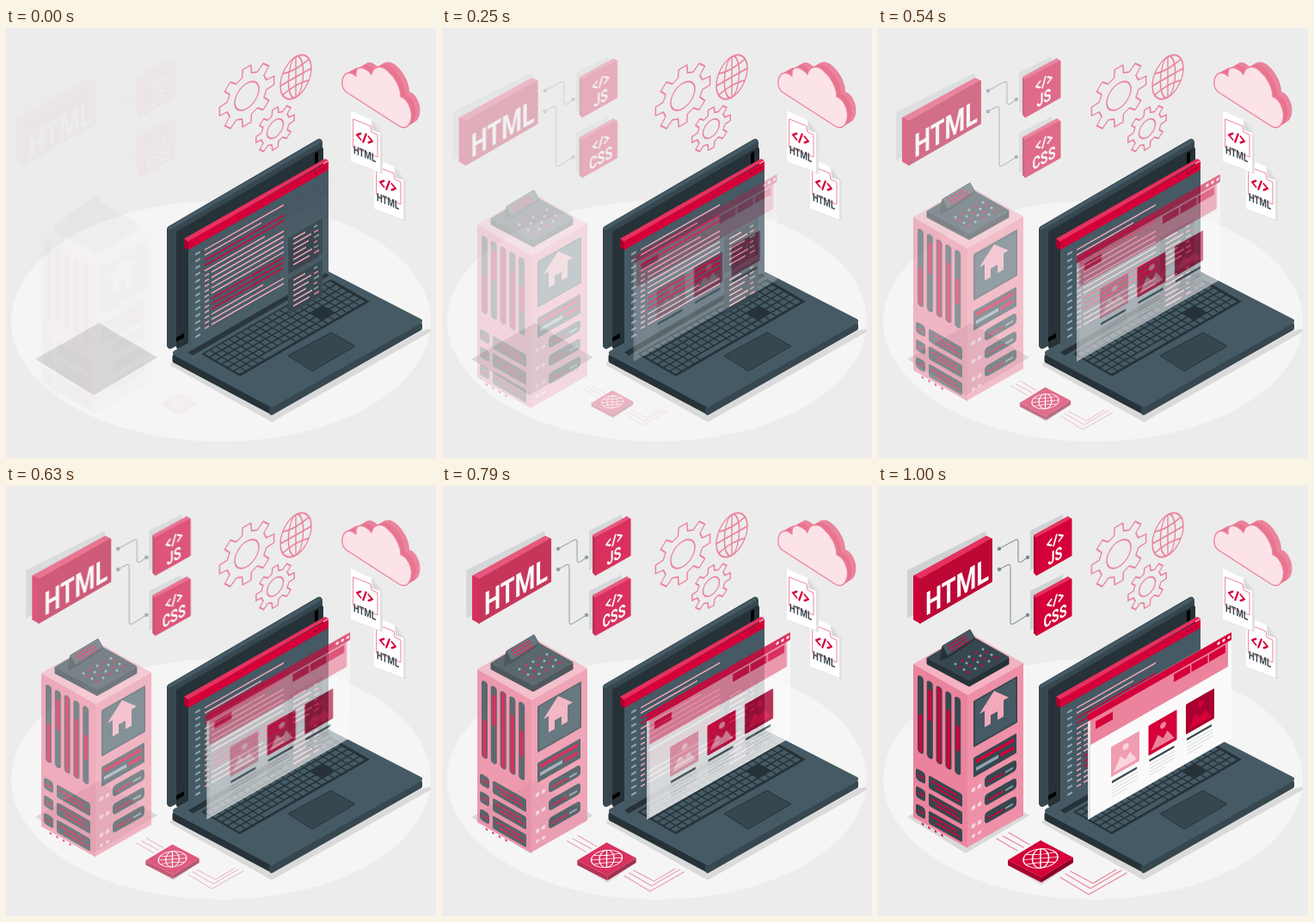
These frames come from a looping animation (500x500 px, 1.04 s). An HTML page:

```html
<!DOCTYPE html>
<html lang="en">
<head>
<meta charset="utf-8">
<title>Web development</title>
<style>
html, body { margin: 0; height: 100%; overflow: hidden; background: #ececec }
svg { display: block; width: 100vw; height: 100vh }
text { font-family: Roboto, Arial, sans-serif; font-weight: 700; text-anchor: middle }
</style>
</head>
<body>
<script>
const RED = '#d50039', DEEP = '#a8002f', PINK = '#eb839d', PALE = '#f3a9ba';
const INK = '#263238', SLATE = '#37474f', STEEL = '#455a64', MIST = '#90a4ae';

// Shape helpers, all returning SVG markup
const poly = (points, fill, extra = '') => `<polygon points="${points}" fill="${fill}" ${extra}/>`;
const rect = (x, y, w, h, fill, r = 0) =>
  `<rect x="${x}" y="${y}" width="${w}" height="${h}" rx="${r}" fill="${fill}"/>`;
const path = (d, fill, extra = '') => `<path d="${d}" fill="${fill}" ${extra}/>`;
const line = (d, color, w = 1) =>
  path(d, 'none', `stroke="${color}" stroke-width="${w}" stroke-linecap="round" stroke-linejoin="round"`);
const dot = (x, y, r, fill) => `<circle cx="${x}" cy="${y}" r="${r}" fill="${fill}"/>`;
const group = (transform, body) => `<g transform="${transform}">${body}</g>`;
const slant = (x, y, body, slope = -.57) => group(`matrix(1 ${slope} 0 1 ${x} ${y})`, body);
const times = (n, fn) => Array.from({ length: n }, (_, i) => fn(i)).join('');
const label = (x, y, size, str, fill = '#fff') =>
  group(`matrix(.8 -.456 0 1.1 ${x} ${y})`, `<text font-size="${size}" fill="${fill}">${str}</text>`);
const round = (color, w) => `stroke="${color}" stroke-width="${w}" stroke-linejoin="round"`;
const tag = (k, color, w) =>
  line(`M${-5 * k} ${-4 * k}l${-5 * k} ${4 * k}l${5 * k} ${4 * k}M${2 * k} ${-6 * k}L${-2 * k} ${6 * k}` +
    `M${5 * k} ${-4 * k}l${5 * k} ${4 * k}l${-5 * k} ${4 * k}`, color, w);

function gear(x, y, r, hole, teeth) {
  const pts = [];
  for (let i = 0; i < teeth; i++)
    for (const [shift, k] of [[-.3, .73], [-.19, 1], [.19, 1], [.3, .73]]) {
      const a = (i + shift) / teeth * 2 * Math.PI;
      pts.push((Math.cos(a) * r * k).toFixed(1) + ',' + (Math.sin(a) * r * k).toFixed(1));
    }
  return group(`matrix(1 -.57 0 1.05 ${x} ${y})`,
    poly(pts.join(' '), 'none', round(PINK, 1.5)) +
    `<circle r="${hole}" fill="none" stroke="${PINK}" stroke-width="1.5"/>`);
}

const globe = (matrix, r, color, w) => group(`matrix(${matrix})`,
  `<g fill="none" stroke="${color}" stroke-width="${w}"><circle r="${r}"/><ellipse rx="${r * .48}" ry="${r}"/>` +
  `<path d="M${-r} 0H${r}M0 ${-r}V${r}M${-r * .84} ${-r * .52}Q0 ${-r * .3} ${r * .84} ${-r * .52}` +
  `M${-r * .84} ${r * .52}Q0 ${r * .3} ${r * .84} ${r * .52}"/></g>`);

function cloud() {
  const d = 'M395 74C388 67 390 52 400 52Q404 53 407 56C406 46 412 44 418 48Q422 50 425 54' +
    'C427 44 437 43 444 50C452 57 459 69 459 80C468 83 473 97 471 106C469 115 464 118 457 114Z';
  return times(10, i => group(`translate(${10 - i} ${(i - 10) * .6})`, path(d, i < 5 ? PINK : '#e8748f'))) +
    path(d, '#fbe3e8', round(PINK, 1.3));
}

const page = (x, y) => group(`translate(${x} ${y})`,
  path('M3 1L27 13L37 27V74L3 61Z', '#e2e2e2') +
  path('M0 0L24 11L34 26V72L0 59Z', '#fff') +
  path('M24 11L34 26L25 23Z', '#d9d9d9') +
  line('M3 10L23 18L24 25L31 28V54L3 43Z', PINK, 1) +
  slant(16, 32, tag(.9, RED, 2), .4) +
  group('matrix(.8 .32 0 1.1 16 55)', `<text font-size="12" fill="${SLATE}">HTML</text>`));

function keyboard() {
  const at = (a, b) => `${(227 + 151 * a + 45 * b).toFixed(1)},${(379 - 87 * a + 26 * b).toFixed(1)} `;
  const cell = (a, b, w, h, fill) => poly(at(a, b) + at(a + w, b) + at(a + w, b + h) + at(a, b + h), fill);
  return cell(0, 0, 1, 1, INK) + times(6, r => times(20, c => {
    const gap = (c == 14 || c == 15) && (r == 3 || r == 4), space = r == 5 && c > 4 && c < 9;
    return gap || space ? '' :
      cell(.014 + c * .0487, .04 + r * .156, r == 5 && c == 4 ? .235 : .04, .12, STEEL);
  }));
}

function codeWindow() {
  const rows = 'p92 p66 r92 r92 p70 p84 p84 p84 p84 p84 r84 r84 r84 p60 p84 p84'.split(' ');
  const main = rows.map((row, i) => {
    const inset = i > 4 ? 8 : 0, y = 11 + i * 6.1, color = row[0] == 'r' ? RED : PALE;
    return (inset ? rect(19, y, 5, 1.7, PALE) : '') + rect(19 + inset, y, +row.slice(1), 1.7, color);
  }).join('');
  const side = [57, 105].map(top => rect(116, top - 4, 40, 42, SLATE) + times(6, i =>
    rect(122, top + i * 6, 14 + i * 7 % 10, 1.8, PALE) + rect(146, top + i * 6, 4 + i % 3, 1.8, i % 2 ? PINK : MIST)
  )).join('');
  return slant(212, 257,
    rect(0, 0, 163, 119, STEEL) +
    times(13, i => rect(8, 10 + i * 8, 6, 2.4, MIST, 1)) + main + side) +
    poly('207,245 371,152 375,154 212,249', '#e6315f') +
    poly('207,245 212,249 212,258 207,255', DEEP) +
    slant(212, 248, rect(0, 0, 163, 10, RED) + times(3, i => dot(148 + i * 5, 5, 1.5, DEEP)));
}

const laptop = () =>
  poly('193,391 309,452 484,354 492,352 309,456', '#dadada', round('#dadada', 4)) +
  // lid
  poly('191,234 364,133 365,284 191,369', SLATE, round(SLATE, 8)) +
  poly('200,238 367,141 367,280 200,371', INK, round(INK, 4)) +
  line('M190 233L364 132', STEEL, 4) +
  poly('198,360 207,355 207,360 198,365', '#000') +
  poly('359,146 363,143 363,156 359,158', '#000') +
  // base
  poly('196,382 309,443 309,447 196,387', INK, round(INK, 5)) +
  poly('309,443 481,345 481,349 309,447', SLATE, round(SLATE, 6)) +
  poly('197,378 372,285 481,341 309,438', STEEL, round(STEEL, 6)) +
  poly('212,377 371,284 376,288 217,381', INK) +
  keyboard() +
  poly('328,381 378,354 406,370 356,399', SLATE, round(INK, 1)) +
  codeWindow();

const scenery = () =>
  '<ellipse cx="250" cy="341" rx="244" ry="140" fill="#f5f5f5"/>' +
  poly('34,385 108,343 176,383 102,427', '#d9d9d9') +
  gear(280, 79, 32, 14, 8) + gear(313, 117, 22.5, 9.5, 8) +
  globe('1 -.57 0 1.31 337 57', 18, PINK, 1.4) +
  cloud() + page(428, 151) + page(401, 96) + laptop();

function badge(y, str) {
  return group(`translate(0 ${y})`,
    poly('177,52 215,33 215,78 177,98', '#cfd2d4') +
    poly('181,57 221,35 225,38 184,60', '#e6315f') +
    poly('181,57 184,60 184,104 181,101', DEEP) +
    poly('184,60 225,38 225,81 184,104', RED, round(RED, 1)) +
    slant(206, 63, tag(.9, '#fff', 2)) + label(206, 88, 18, str));
}

const tags = () =>
  poly('34,98 124,53 126,55 126,105 34,154', '#cfd2d4') +
  poly('42,105 126,59 132,62 49,109', '#e6315f', round('#e6315f', 2)) +
  poly('42,105 49,109 49,159 42,155', '#d2003a', round('#d2003a', 2)) +
  poly('49,109 132,62 132,111 49,159', '#bd0836', round('#bd0836', 2)) +
  label(92, 130, 34, 'HTML') +
  line('M141 73L159 63Q163 61 163 65V86Q163 90 167 88L174 83M141 97L150 92Q154 90 154 95V158Q154 162 158 160L174 150', '#8d9a9f', 1.2) +
  [[141, 73], [174, 83], [141, 97], [174, 150]].map(([x, y]) => dot(x, y, 2.2, '#78878d')).join('') +
  badge(0, 'JS') + badge(70, 'CSS');

function picture(i) {
  const [back, front] = [['#f09db1', '#fbd5dd'], [RED, PINK], [DEEP, RED]][i];
  return group(`translate(${27 + i * 43.5} 54)`,
    rect(0, 0, 33, 35, back, 1) + dot(17, 9, 3.5, front) +
    path('M3 31L11 17L17 24L22 18L30 31Z', front) +
    rect(1, 40, 29, 2.6, SLATE) +
    times(4, k => rect(1, 46 + k * 4, k == 3 ? 18 : 30, 1, '#d5d8da')));
}

const site = () => slant(244, 265,
  rect(0, 0, 167, 123, '#fafafa') + rect(0, 9, 3, 114, '#e4e4e4') +
  rect(3, 9, 160, 29, PINK) +
  rect(0, 0, 167, 9, RED, 1) +
  times(3, i => dot(152 + i * 6, 4.5, 1.7, '#fff')) +
  rect(9, 14, 20, 9, RED) +
  times(3, i => rect(100 + i * 20.5, 11, 19, 9, RED)) +
  times(3, picture));

function tower() {
  // red stretches of each vertical slot: start, length
  const fills = [[44, 44], [9, 36], [0, 88], [20, 68], [32, 30]];
  const left = fills.map(([from, len], i) =>
    rect(5 + i * 10.8, 9, 7, 90, SLATE, 3.5) + rect(6.5 + i * 10.8, 10 + from, 4, len, RED, 2)).join('') +
    times(3, i => group(`translate(0 ${119 + i * 20.5})`,
      rect(3, 0, 11, 13, SLATE, 3) + rect(5, 6, 7, 2, RED) +
      rect(18, 0, 39, 15, SLATE, 2) + rect(21, 4, 30, 2, RED) + rect(26, 9, 28, 2, RED))) +
    times(4, i => dot(11 + i * 7.5, 180, 1.3, RED));
  const right = rect(7, 11, 51, 54, SLATE, 1) + rect(9, 13, 47, 50, STEEL) +
    group('translate(31 33)', path('M0 -20L17 -3H11V16H4V6H-4V16H-11V-3H-17Z', PALE)) +
    rect(7, 77, 50, 23, SLATE, 1) + rect(10, 81, 44, 4, RED) + rect(10, 90, 26, 4, MIST) + rect(38, 90, 16, 4, RED) +
    times(3, i => group(`translate(0 ${107 + i * 21})`,
      dot(7, 7, 2.4, '#fbd5dd') + dot(14, 7, 2.4, '#fbd5dd') + rect(20, 0, 37, 13, SLATE, 4) +
      rect(24, 7, 18, 2, RED) + rect(44, 7, 9, 2, MIST))) +
    dot(7, 168, 2, '#fbd5dd') + dot(14, 168, 2, '#fbd5dd');
  const keys = times(4, r => times(5, c => dot(90 + c * 8 + r * 5, 207 - c * 4.3 + r * 3.2, 1.5, r + c & 1 ? RED : MIST)));
  return poly('41,207 105,170 169,206 104,243', '#f4b3c2') +
    slant(41, 207, rect(0, 0, 63.3, 178, PINK) + left, .57) +
    slant(104, 243, rect(0, 0, 65, 177, '#ee91a8') + right) +
    poly('57,200 106,226 152,200 152,207 106,233 57,207', INK, round(INK, 1)) +
    poly('57,200 104,172 152,199 106,226', SLATE, round(SLATE, 1)) + keys +
    poly('72,203 75,186 107,167 113,178 82,199', INK, round(INK, 1)) +
    poly('75,186 107,167 112,177 81,197', STEEL) +
    times(3, i => line(`M${81 + i * 2} ${186 + i * 3}L${102 + i * 2} ${174 + i * 3}`, RED, 1.4));
}

const chip = () =>
  line('M138 410L162 424M145 407L169 420M152 403L176 417', PINK, 1.2) +
  line('M212 455L245 475L289 450M218 451L247 468L283 447M224 448L250 462L277 446', PINK, 1.2) +
  poly('151,441 189,418 227,438 190,464', '#d9d9d9') +
  poly('151,435 190,455 190,461 151,441', DEEP) +
  poly('190,455 227,432 227,438 190,461', '#8c0027') +
  poly('151,435 189,412 227,432 190,455', RED) +
  globe('1 -.08 0 .56 189 433', 20, '#fff', 1.5);

document.body.innerHTML = `<svg viewBox="0 0 500 500">${scenery()}
  <g id="tower">${tower()}</g><g id="chip">${chip()}</g><g id="slide">${tags()}${site()}</g></svg>`;

const [towerEl, chipEl, slideEl] = ['tower', 'chip', 'slide'].map(id => document.getElementById(id));

// 25 poses at 24 per second
function draw() {
  const p = Math.floor((performance.now() % 1040 + 4) * .024) / 24;
  const q = Math.min(p, 1), off = 28.5 * (1 - q), s = .52 + .48 * q;
  towerEl.setAttribute('transform', `translate(0 ${off})`);
  slideEl.setAttribute('transform', `translate(${-off} 0)`);
  chipEl.setAttribute('transform', `translate(214 438) scale(${s}) translate(-214 -438)`);
  for (const el of [towerEl, chipEl, slideEl]) el.setAttribute('opacity', .03 + .97 * q);
  requestAnimationFrame(draw);
}
draw();
</script>
</body>
</html>
```
